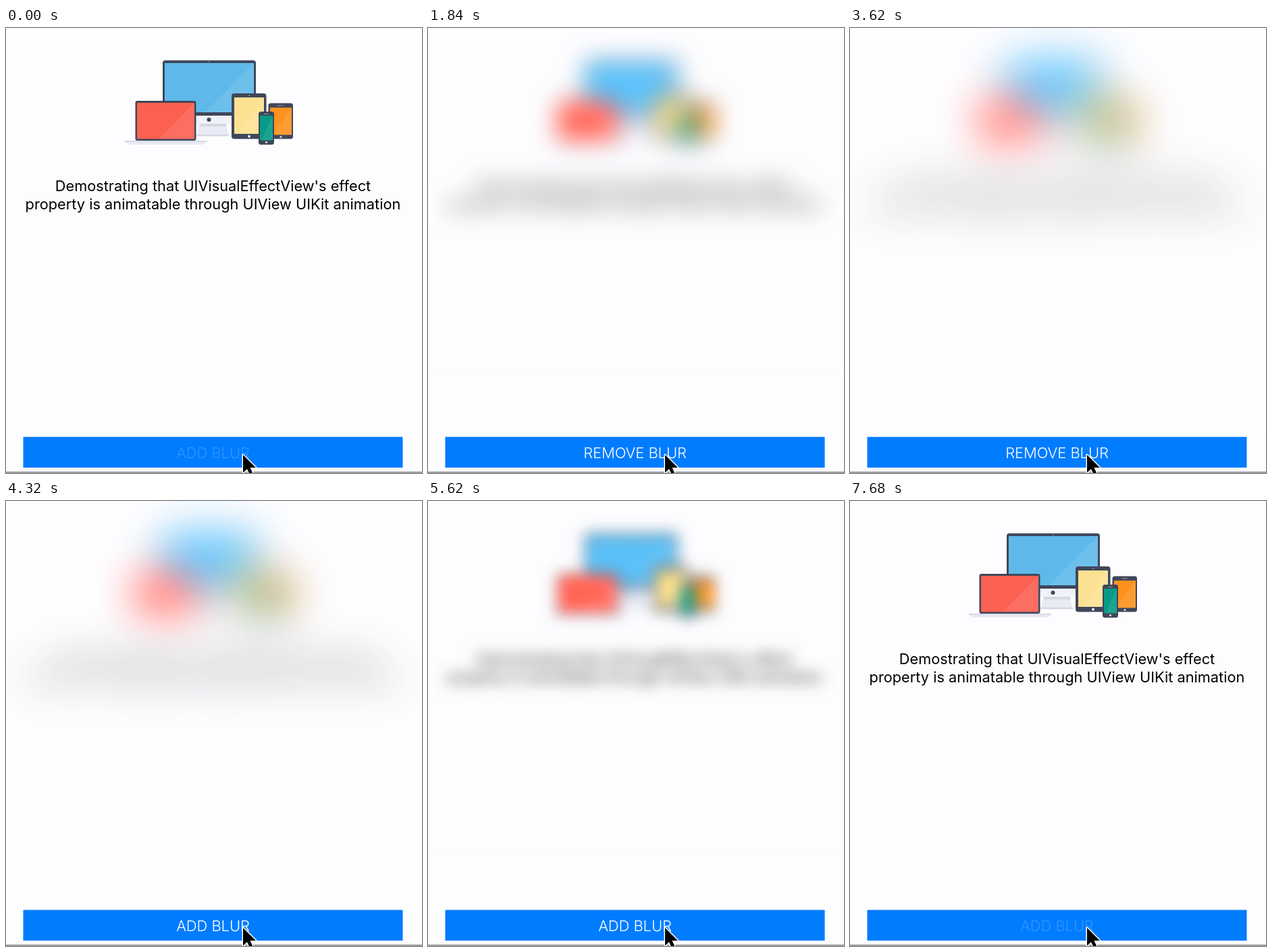
These frames come from a looping animation (616 by 660 pixels, 7780 ms). An HTML page:

```html
<!DOCTYPE html>
<html lang="en">
<head>
<meta charset="utf-8">
<title>Animated blur</title>
<style>
  html, body { margin: 0; width: 616px; height: 660px; overflow: hidden; background: #fdfdff; }
  svg { display: block; }
  text { font-family: Inter, "Open Sans", sans-serif; text-anchor: middle; }
  .copy { font-size: 21.75px; }
  .label { font-size: 22px; font-weight: 300; letter-spacing: -.1px; fill: #fff; }
  .body { fill: #3f475a; }
  .shine { fill: #fff; opacity: .09; }
  .base { fill: #e8eaf4; }
  .shade { fill: #d5d9e6; }
  .pointer { stroke: #fff; stroke-width: 3; stroke-linejoin: round; paint-order: stroke; }
</style>
</head>
<body>
<svg width="616" height="660" viewBox="0 0 616 660">
  <defs>
    <filter id="blur" filterUnits="userSpaceOnUse" x="-120" y="-120" width="856" height="640" color-interpolation-filters="sRGB">
      <feGaussianBlur id="soft" stdDeviation="0"/>
      <feColorMatrix id="vivid" type="saturate" values="1"/>
    </filter>
  </defs>
  <rect width="616" height="660" fill="#fdfdff"/>

  <g id="scene">
    <rect x="-120" y="-120" width="856" height="640" fill="#fdfdff"/>

    <!-- desktop -->
    <path class="base" d="M287 141h39l3 18h-46z"/>
    <path class="shade" d="M282 158h48v2.5h-48z"/>
    <path d="M234 128h134v11q0 3-3 3H237q-3 0-3-3z" fill="#f1f2f9"/>
    <path class="shade" d="M287 142h39l1 4h-41z"/>
    <rect class="body" x="232" y="48" width="138" height="82" rx="4"/>
    <rect x="235" y="52" width="132" height="73" fill="#5eb9ea"/>
    <path class="shine" d="M367 52v73h-72z"/>
    <circle class="body" cx="300.5" cy="136" r="3"/>
    <circle cx="301" cy="50" r=".8" fill="#bbb"/>

    <!-- laptop -->
    <path class="base" d="M176 167h122q0 3-6 6H182q-6-3-6-6z"/>
    <path class="shade" d="M176 167h122v2H176z"/>
    <rect class="body" x="191.5" y="108" width="90" height="59" rx="3"/>
    <rect x="194" y="111" width="85" height="53.5" fill="#fb6051"/>
    <path class="shine" d="M279 111v53.5h-53z"/>

    <!-- large phone -->
    <rect class="body" x="388.5" y="111.5" width="36.5" height="53" rx="3.5"/>
    <rect x="391" y="118" width="32" height="40.5" fill="#fc921f"/>
    <path class="shine" d="M423 118v40.5h-29z"/>
    <path d="M402 115h9" stroke="#999"/>
    <circle cx="407" cy="161.5" r="1.5" fill="#ddd"/>

    <!-- tablet -->
    <rect class="body" x="334" y="97" width="51.5" height="67.500" rx="4"/>
    <rect x="338" y="103" width="44" height="54" fill="#fce192"/>
    <path class="shine" d="M382 103v54h-38z"/>
    <circle cx="360" cy="100" r=".8" fill="#bbb"/>
    <circle cx="360" cy="160.7" r="2" fill="#eee"/>

    <!-- small phone -->
    <rect class="body" x="374" y="124" width="23" height="49" rx="3.5"/>
    <rect x="376" y="130" width="19" height="36.5" fill="#079a86"/>
    <path class="shine" d="M395 130v36.5h-17z"/>
    <path d="M382 127.5h7" stroke="#999"/>
    <circle cx="385.5" cy="169.5" r="1.5" fill="#eee"/>

    <text class="copy" x="306.5" y="242">Demostrating that UIVisualEffectView's effect</text>
    <text class="copy" x="306.5" y="268.5">property is animatable through UIView UIKit animation</text>
  </g>
  <rect id="veil" width="616" height="600" fill="#fdfdff" opacity="0"/>

  <rect x="25.5" y="606.5" width="562" height="45.5" fill="#007cff"/>
  <text id="label" class="label" x="306.5" y="638"></text>
  <rect y="658" width="616" height="1.6" fill="#82828a"/>
  <path class="pointer" d="M351 633v26.500l6-5.500 5 11 4.500-2-5-11h8.500z"/>
</svg>

<script>
const LOOP = 7780, RUN = 3000, ADD = 260, REMOVE = 3830;
const RADIUS = 33, FAINT = .18;
const $ = id => document.getElementById(id);
const clamp = v => Math.min(1, Math.max(0, v));

// ease-in-out: cubic-bezier(.42, 0, .58, 1)
function ease(x) {
  let lo = 0, hi = 1;
  for (let i = 0; i < 20; i++) {
    const s = (lo + hi) / 2, r = 1 - s;
    if (1.26 * s * r * r + 1.74 * s * s * r + s ** 3 < x) lo = s; else hi = s;
  }
  return lo * lo * (3 - 2 * lo);
}

// fades back after release, dims on the next press
const glow = (t, release, press) =>
  FAINT + (1 - FAINT) * clamp((t - release) / 450) * (1 - clamp((t - press) / 120));

function draw(now) {
  const t = now % LOOP;
  const amount = ease(clamp((t - ADD) / RUN)) - ease(clamp((t - REMOVE) / RUN));
  $("scene").setAttribute("filter", amount > .0005 ? "url(#blur)" : "none");
  $("soft").setAttribute("stdDeviation", (RADIUS * amount).toFixed(3));
  $("vivid").setAttribute("values", 1 + .6 * amount);
  $("veil").setAttribute("opacity", .2 * amount);

  const added = t >= ADD && t < REMOVE;
  $("label").textContent = added ? "REMOVE BLUR" : "ADD BLUR";
  $("label").setAttribute("opacity",
    t < ADD ? FAINT : added ? glow(t, ADD, 3640) : glow(t, REMOVE, 7540));
}

const start = performance.now();
function tick() {
  draw(performance.now() - start);
  requestAnimationFrame(tick);
}
tick();
</script>
</body>
</html>
```
